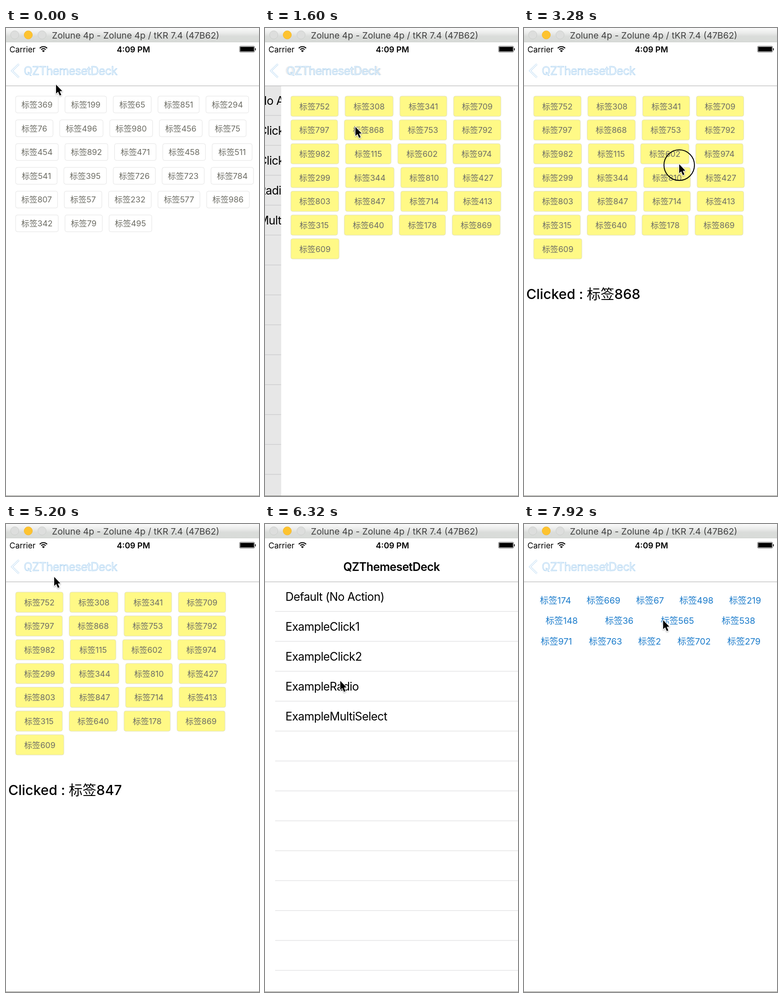
An HTML page with a canvas for the animation above (8 s loop, 551x1017 px).

```html
<!DOCTYPE html>
<html lang="en">
<head>
<meta charset="utf-8">
<title>Tag views</title>
<style>
  html, body { margin: 0; width: 100%; height: 100%; overflow: hidden; background: #fff; }
  canvas { display: block; width: 551px; height: 1017px; }
</style>
</head>
<body>
<canvas id="stage" width="551" height="1017"></canvas>
<script>
const W = 551, H = 1017, LOOP = 8000, STEP = 80;
const ctx = document.getElementById('stage').getContext('2d');
const FONT = 'Inter, "Noto Sans CJK SC", "Noto Sans CJK", sans-serif';
const APP = 'QZThemesetDeck';
const DEVICE = 'Zolune 4p';
const ROWS = ['Default (No Action)', 'ExampleClick1', 'ExampleClick2', 'ExampleRadio', 'ExampleMultiSelect'];

// Each row: tag numbers, left edges, right edge of the last tag.
const PLAIN = [
  ['369 199 65 851 294', [21, 128.5, 233.5, 331, 435.5], 528.5],
  ['76 496 980 456 75', [21, 117, 226, 334, 442], 523],
  ['454 892 471 458 511', [21, 128.5, 236.5, 341.5, 449], 536],
  ['541 395 726 723 784', [21, 126, 233.5, 340, 446.5], 539],
  ['807 57 232 577 986', [21, 127, 223.5, 331, 437], 530],
  ['342 79 495', [21, 128.5, 224.5], 317.5]
];
const YELLOW = [
  ['752 308 341 709', [21, 139, 258.5, 375.5], 478.5],
  ['797 868 753 792', [21, 137.5, 257, 375], 478.5],
  ['982 115 602 974', [21, 140, 254, 374], 477],
  ['299 344 810 427', [21, 140, 260.5, 377], 480],
  ['803 847 714 413', [21, 140, 260.5, 377], 478.5],
  ['315 640 178 869', [21, 137.5, 257, 372.5], 477],
  ['609', [21], 126]
];
// Each row: tag numbers, centres.
const BLUE = [
  ['174 669 67 498 219', [68.5, 173, 274.5, 375.5, 481.5]],
  ['148 36 565 538', [82, 207.5, 334, 467]],
  ['971 763 2 702 279', [70.5, 177.5, 273.5, 370.5, 479]]
];

// start, duration, detail page, direction (1 opens it, 0 closes it)
const MOVES = [
  [400, 480, drawPlain, 0],
  [1360, 400, drawYellow, 1],
  [5520, 440, drawYellow, 0],
  [6720, 480, drawBlue, 1]
];
const CLICKS = [240, 1280, 2080, 3200, 4160, 5440, 6640];
const PRESS = 160;

// time, x, y of the pointer tip
const PATH = [
  [0, 109, 123], [240, 62, 97], [480, 62, 97], [1120, 197, 215], [1680, 197, 215],
  [2000, 209, 217], [2400, 209, 217], [3040, 338, 296], [3440, 338, 296],
  [4000, 190, 375], [4560, 190, 375], [5200, 105, 115], [5360, 60, 97], [5600, 60, 97],
  [6320, 164, 341], [6480, 180, 291], [6960, 180, 291], [7760, 303, 209], [8000, 303, 209]
];

const clamp = v => Math.min(1, Math.max(0, v));
const smooth = p => p * p * (3 - 2 * p);
const easeOut = p => 1 - (1 - p) ** 3;
const mix = (a, b, p) => a + (b - a) * p;

function text(str, x, y, size, { weight = 400, color = '#000', align = 'left', track = 0 } = {}) {
  ctx.font = `${weight} ${size}px ${FONT}`;
  ctx.letterSpacing = track + 'px';
  ctx.textAlign = align;
  ctx.fillStyle = color;
  ctx.fillText(str, x, y);
}

function rect(x, y, w, h, color) {
  ctx.fillStyle = color;
  ctx.fillRect(x, y, w, h);
}

function line(points, width, color) {
  ctx.beginPath();
  points.forEach(([x, y]) => ctx.lineTo(x, y));
  ctx.lineWidth = width;
  ctx.strokeStyle = color;
  ctx.stroke();
}

function circle(x, y, r, fill, stroke, width = 1) {
  ctx.beginPath();
  ctx.arc(x, y, r, 0, Math.PI * 2);
  if (fill) { ctx.fillStyle = fill; ctx.fill(); }
  ctx.lineWidth = width;
  ctx.strokeStyle = stroke;
  ctx.stroke();
}

function drawTags(rows, height, fill, border, color) {
  const gap = 14.7;
  rows.forEach(([names, lefts, end], r) => {
    const top = 148 + r * 51.65;
    names.split(' ').forEach((name, i) => {
      const x = lefts[i];
      const right = i + 1 < lefts.length ? lefts[i + 1] - gap : end;
      ctx.beginPath();
      ctx.roundRect(x, top, right - x, height, 4);
      ctx.fillStyle = fill;
      ctx.fill();
      ctx.lineWidth = 1;
      ctx.strokeStyle = border;
      ctx.stroke();
      text('标签' + name, (x + right) / 2, top + height / 2 + 6.6, 17.6, { color, align: 'center' });
    });
  });
}

function drawPlain() {
  drawTags(PLAIN, 36.5, '#fff', '#e3e3e3', '#6c6c64');
}

function drawYellow(t) {
  drawTags(YELLOW, 44, '#fff986', '#e0dfc0', '#6c6c66');
  const picked = t < 2160 ? '' : t < 4240 ? '868' : '847';
  if (picked) text('Clicked : 标签' + picked, 5, 589, 30, { weight: 500 });
}

function drawBlue() {
  BLUE.forEach(([names, centres], r) => {
    names.split(' ').forEach((name, i) => {
      text('标签' + name, centres[i], 173 + r * 44.3, 19.1, { color: '#1a7bcb', align: 'center' });
    });
  });
}

function drawList() {
  ROWS.forEach((row, i) => text(row, 44.5, 166.5 + i * 65, 25, { track: -0.6 }));
  for (let y = 189; y < H; y += 65) rect(22, y, W - 22, 2, '#ebebec');
}

function layer(x, draw, t) {
  ctx.save();
  ctx.translate(x, 0);
  rect(0, 126, W, H - 126, '#fff');
  draw(t);
  ctx.restore();
}

function drawWindowBar() {
  const shade = ctx.createLinearGradient(0, 0, 0, 30);
  shade.addColorStop(0, '#fafafa');
  shade.addColorStop(0.35, '#ebeceb');
  shade.addColorStop(0.6, '#dadcda');
  shade.addColorStop(1, '#d8dbd8');
  rect(0, 0, W, 30, shade);
  rect(0, 30, W, 1, '#cccecc');
  circle(19, 15, 9, '#dddedd', '#cccecc');
  circle(48.5, 15, 9, '#fdc330', '#f3b92e');
  circle(78.5, 15, 9, '#dddedd', '#cccecc');
  text(`${DEVICE} - ${DEVICE} / tKR 7.4 (47B62)`, 100, 22.5, 19.3, { color: '#404040' });
}

function drawStatus() {
  text('Carrier', 7.5, 52.5, 17.4);
  text('4:09 PM', 277.5, 52.5, 17.7, { weight: 600, align: 'center' });

  // Signal fan
  const a = -Math.PI * 0.76, b = -Math.PI * 0.24;
  ctx.strokeStyle = '#000';
  ctx.lineWidth = 2.2;
  for (const r of [6.6, 11]) {
    ctx.beginPath();
    ctx.arc(81.5, 51.5, r, a, b);
    ctx.stroke();
  }
  ctx.beginPath();
  ctx.moveTo(81.5, 52.5);
  ctx.arc(81.5, 52.5, 4.2, a, b);
  ctx.fillStyle = '#000';
  ctx.fill();

  ctx.beginPath();
  ctx.roundRect(508.5, 39.5, 33, 13, 2.5);
  ctx.lineWidth = 1;
  ctx.strokeStyle = '#555';
  ctx.stroke();
  rect(510, 41, 30, 10, '#000');
  rect(542.5, 44, 1.5, 4.5, '#000');
}

// p runs from 0 (list) to 1 (detail)
function drawNav(p) {
  rect(0, 30, W, 96, '#fff');
  rect(0, 125, W, 1.3, '#bcbcbe');
  drawStatus();
  ctx.save();
  ctx.globalAlpha = 1 - p;
  text(APP, mix(275.5, 140, p), 102, 25, { weight: 600, align: 'center', track: -0.6 });
  ctx.globalAlpha = p;
  const x = mix(170, 38.5, p);
  text(APP, x, 102, 25, { color: '#eef6fd', track: -0.7 });
  ctx.lineWidth = 0.5;
  ctx.strokeStyle = '#7ab8e8';
  ctx.strokeText(APP, x, 102);
  const chevron = [[28, 78.5], [13, 93], [28, 107.5]];
  line(chevron, 3.4, '#9fcbee');
  line(chevron, 2.2, '#fff');
  ctx.restore();
}

function pointerAt(t) {
  const i = Math.max(1, PATH.findIndex(k => k[0] > t));
  const [t0, x0, y0] = PATH[i - 1], [t1, x1, y1] = PATH[i];
  const p = smooth(clamp((t - t0) / (t1 - t0)));
  return [mix(x0, x1, p), mix(y0, y1, p)];
}

function drawPointer(t) {
  const [x, y] = pointerAt(t);
  if (CLICKS.some(c => t >= c && t < c + PRESS)) circle(x, y + 2, 33.2, null, '#000', 2);
  ctx.save();
  ctx.translate(x, y);
  ctx.beginPath();
  [[0, 0], [0, 19.5], [4.4, 15.6], [8, 23.8], [11.4, 22.3], [7.8, 14.4], [13.4, 14]]
    .forEach(([px, py]) => ctx.lineTo(px, py));
  ctx.closePath();
  ctx.shadowColor = 'rgba(0,0,0,.3)';
  ctx.shadowBlur = 3;
  ctx.shadowOffsetY = 1.5;
  ctx.lineWidth = 2.4;
  ctx.lineJoin = 'round';
  ctx.strokeStyle = '#fff';
  ctx.stroke();
  ctx.shadowColor = 'transparent';
  ctx.fillStyle = '#000';
  ctx.fill();
  ctx.restore();
}

function render(t) {
  const move = MOVES.filter(m => t >= m[0]).pop() || MOVES[0];
  const [start, length, page, opens] = move;
  const eased = easeOut(clamp((t - start) / length));
  const p = opens ? eased : 1 - eased;

  rect(0, 0, W, H, '#fff');
  if (p < 1) {
    layer(-0.3 * W * p, drawList, t);
    rect(0, 126, W, H - 126, `rgba(0,0,0,${0.1 * p})`);
  }
  if (p > 0) layer(W * (1 - p), page, t);
  drawNav(p);
  drawWindowBar();
  rect(0, H - 1, W, 1, '#85857e');
  drawPointer(t);
}

function frame(now) {
  render(Math.floor((now % LOOP) / STEP) * STEP);
  requestAnimationFrame(frame);
}
requestAnimationFrame(frame);
</script>
</body>
</html>
```
